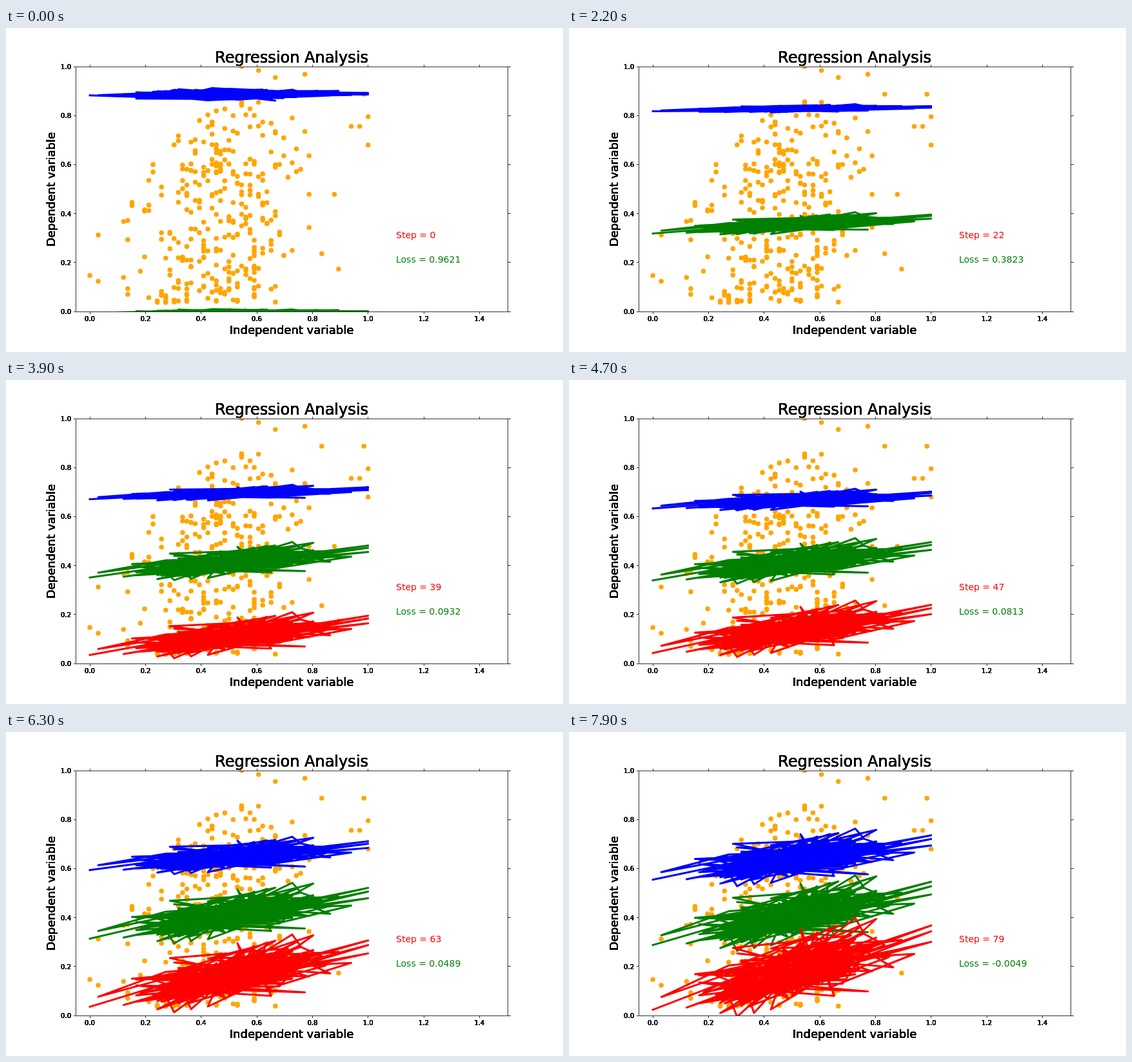
Animation, 864 px wide and 504 px high, one loop 8000 ms. Source, as an HTML page with a canvas:

```html
<!DOCTYPE html>
<html lang="en">
<head>
<meta charset="utf-8">
<title>Regression Analysis</title>
<style>
html, body { margin: 0; width: 100%; height: 100%; overflow: hidden; background: #fff; }
canvas { display: block; }
</style>
</head>
<body>
<canvas id="stage" width="864" height="504"></canvas>
<script>
const ctx = document.getElementById('stage').getContext('2d');
const LEFT = 108, RIGHT = 778, TOP = 60, BOTTOM = 441;
const COLS = 66; // x values lie on a grid of 1/66
const px = x => 130 + 431.7 * x;
const py = y => BOTTOM - 381 * y;

let seed = 7;
function rnd() {
  seed = (seed * 1664525 + 1013904223) % 4294967296;
  return seed / 4294967296;
}
const bell = () => (rnd() + rnd() + rnd() - 1.5) * 2; // sd 1, range -3..3
const clamp = (v, lo, hi) => Math.max(lo, Math.min(hi, v));
const column = (mean, sd, lo, hi) => Math.round(clamp(mean + sd * bell(), lo, hi));

// Scatter: a few lone points (column, pixel height) around a seeded cloud
const dots = [
  [0, 385], [2, 322], [2, 394], [8, 301], [8, 388], [36, 60], [40, 66], [44, 77],
  [51, 72], [55, 103], [65, 103], [66, 138], [66, 182], [62, 153], [64, 153], [59, 375]
];
for (let i = 0; i < 315; i++) {
  const k = column(32, 9.5, 9, 60);
  const top = 110 + .19 * (k - 38) ** 2;
  dots.push([k, 427 - (427 - top) * rnd() ** (2 - k / 40)]);
}

// Tips of the fitted lines (column, deviation), each followed by seeded vertices
const tips = [
  [0, -.07], [51, -.98], [19, 1], [66, .3], [28, -.82], [48, .98], [2, .2], [62, -.32],
  [10, .57], [43, -.88], [35, 1.05], [66, -.12], [8, -.23], [53, .82], [66, .15]
];
const vertices = [];
function addVertex(k, deviation) {
  const x = k / COLS, room = Math.min(1, .25 + 3.5 * x * (1 - x));
  vertices.push([x, deviation ?? clamp(.36 * bell(), -.8, .95) * room, .36 * bell() * room]);
}
for (const tip of tips) {
  addVertex(...tip);
  for (let i = 0; i < 20; i++) addVertex(column(33, 11, 11, 59));
}

// Per line: height at x = 0, rise to x = 1, deviation per rise, initial noise
const bands = [
  { color: '#00f', spread: .68, noise: 10,
    base: s => 158 + .875 * s - 54 * Math.exp(-((s / 34) ** 5)),
    rise: s => 2 + .0085 * s * s },
  { color: '#008000', spread: .58, noise: 5,
    base: s => 283 + .57 * s + 160 * Math.exp(-((s / 15.8) ** 2)),
    rise: s => 2 + s },
  { color: '#f00', spread: .56, noise: 0,
    base: s => 408 + .25 * s + 29 * Math.exp((30 - s) / 7),
    rise: s => Math.max(0, 1.45 * s - 6) }
];

const lossKeys = [
  [0, .9621], [14, .5892], [30, .1754], [39, .0932], [47, .0813], [63, .0489], [79, -.0049]
];
function loss(step) {
  const i = Math.max(1, lossKeys.findIndex(([s]) => s >= step));
  const [s0, a] = lossKeys[i - 1], [s1, b] = lossKeys[i];
  return a + (b - a) * (step - s0) / (s1 - s0);
}

function text(str, x, y, size, color, align = 'left') {
  ctx.font = `${size}px "DejaVu Sans", sans-serif`;
  ctx.fillStyle = color;
  ctx.textAlign = align;
  ctx.fillText(str, x, y);
}

// Black labels are painted repeatedly, which hardens their edges
function label(str, x, y, size, align = 'center') {
  for (let i = 0; i < 8; i++) text(str, x, y, size, '#000', align);
}

function drawDots() {
  ctx.fillStyle = '#ffa500';
  for (const [k, y] of dots) {
    ctx.beginPath();
    ctx.arc(px(k / COLS), y, 3.8, 0, 2 * Math.PI);
    ctx.fill();
  }
}

function drawBand({ color, spread, noise, base, rise }, step) {
  const y0 = base(step), slope = rise(step), jitter = noise * Math.exp(-step / 22);
  ctx.strokeStyle = color;
  ctx.lineWidth = 3;
  ctx.lineJoin = 'round';
  ctx.lineCap = 'square';
  ctx.beginPath();
  for (const [x, r, e] of vertices) {
    ctx.lineTo(px(x), y0 - slope * (x + spread * r) - jitter * e);
  }
  ctx.stroke();
}

function drawAxes() {
  ctx.strokeStyle = '#000';
  ctx.lineWidth = .8;
  ctx.lineCap = 'butt';
  ctx.beginPath();
  ctx.rect(LEFT + .5, TOP + .5, RIGHT - LEFT, BOTTOM - TOP);
  const tick = (x, y, dx, dy) => {
    ctx.moveTo(x, y);
    ctx.lineTo(x + dx, y + dy);
  };
  for (let i = 0; i < 8; i++) {
    const x = Math.floor(px(i / 5)) + .5;
    tick(x, BOTTOM, 0, 4);
    tick(x, TOP + 1, 0, -4);
    label((i / 5).toFixed(1), px(i / 5), 456, 10);
  }
  for (let i = 0; i < 6; i++) {
    const y = Math.floor(py(i / 5)) + .5;
    tick(LEFT, y, -3, 0);
    tick(RIGHT, y, 5, 0);
    label((i / 5).toFixed(1), 101, py(i / 5) + 4, 10, 'right');
  }
  ctx.stroke();
  label('Regression Analysis', 443, 54, 24);
  label('Independent variable', 443, 476, 18);
  ctx.save();
  ctx.translate(76, 251);
  ctx.rotate(-Math.PI / 2);
  label('Dependent variable', 0, 0, 18);
  ctx.restore();
}

function draw(step) {
  ctx.fillStyle = '#fff';
  ctx.fillRect(0, 0, 864, 504);
  ctx.save();
  ctx.beginPath();
  ctx.rect(LEFT, TOP, RIGHT - LEFT, BOTTOM - TOP);
  ctx.clip();
  drawDots();
  for (const band of bands) drawBand(band, step);
  ctx.restore();
  drawAxes();
  text(`Step = ${step}`, 605, 327, 14, '#f00');
  text(`Loss = ${loss(step).toFixed(4)}`, 605, 365, 14, '#008000');
}

function frame() {
  draw(Math.floor(performance.now() / 100) % 80);
  requestAnimationFrame(frame);
}
frame();
</script>
</body>
</html>
```
